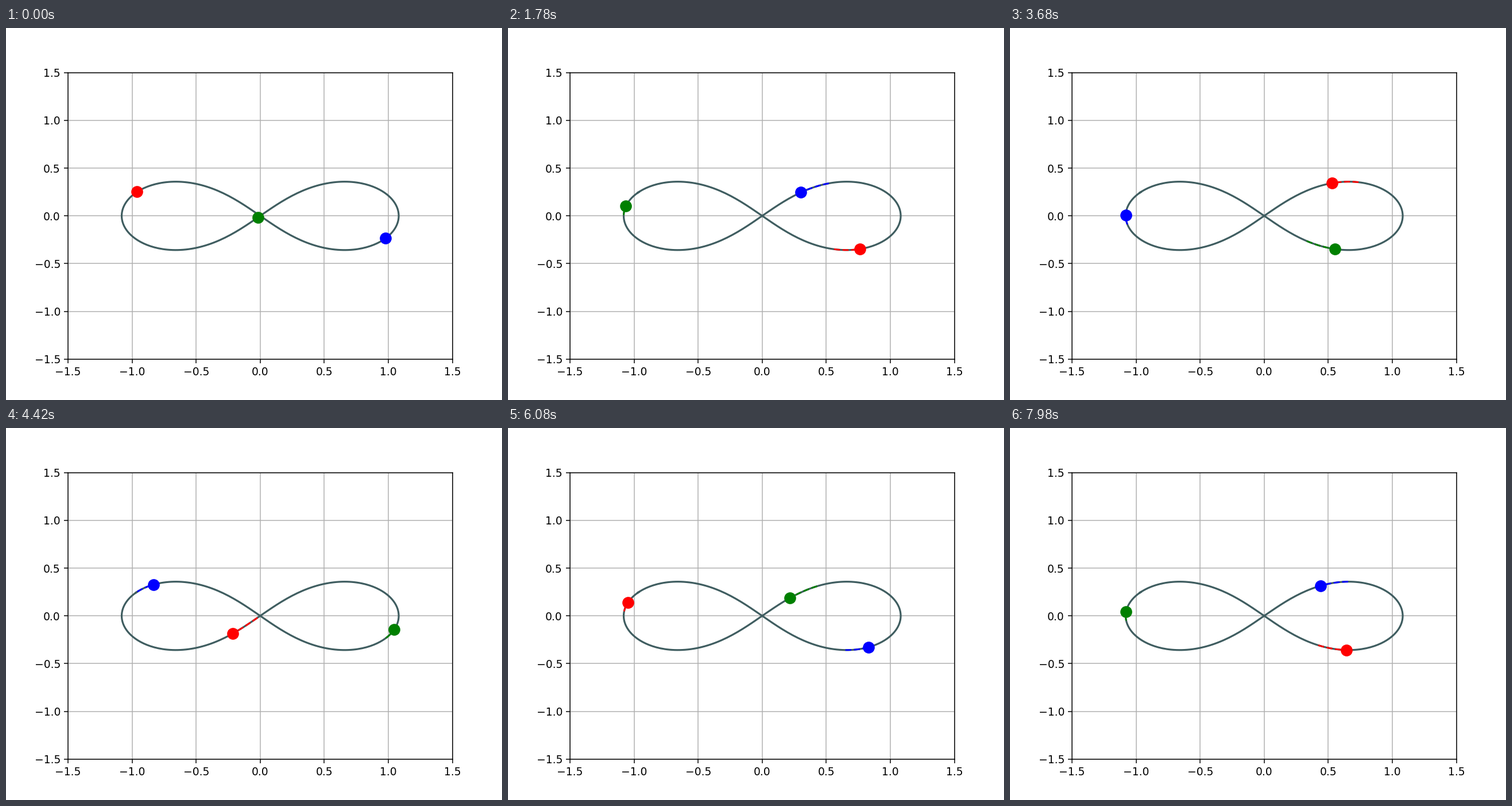
A matplotlib script that plays this animation: 864x648 px, repeating every 8000 ms.

```python
import numpy as np
import matplotlib.pyplot as plt
from matplotlib.animation import FuncAnimation

FRAMES = 400
INTERVAL = 20          # ms
DT = 0.02              # simulated time per frame
SUBSTEPS = 4
TAIL = 10              # steps kept in each coloured tail
PERIOD = 6.32591398
COLORS = ["red", "green", "blue"]


def acceleration(pos):
    """Gravity between three unit masses with G = 1."""
    diff = pos[None, :, :] - pos[:, None, :]
    dist = np.sqrt((diff ** 2).sum(axis=2)) + np.eye(3)
    return (diff / dist[:, :, None] ** 3).sum(axis=1)


def derivative(state):
    pos, vel = state
    return np.array([vel, acceleration(pos)])


def rk4(state, h):
    k1 = derivative(state)
    k2 = derivative(state + h / 2 * k1)
    k3 = derivative(state + h / 2 * k2)
    k4 = derivative(state + h * k3)
    return state + h / 6 * (k1 + 2 * k2 + 2 * k3 + k4)


def simulate(steps):
    """Figure-eight solution; returns positions as (step, body, axis)."""
    p = np.array([0.97000436, -0.24308753])
    v = np.array([-0.93240737, -0.86473146])
    state = np.array([[-p, 0 * p, p], [-v / 2, v, -v / 2]])
    path = [state[0]]
    for _ in range(steps):
        for _ in range(SUBSTEPS):
            state = rk4(state, DT / SUBSTEPS)
        path.append(state[0])
    return np.array(path)


path = simulate(FRAMES)

fig, ax = plt.subplots(figsize=(6.4, 4.8), dpi=135)
ax.set_xlim(-1.5, 1.5)
ax.set_ylim(-1.5, 1.5)
ax.grid(True)

loop = path[:int(PERIOD / DT) + 2, 0]
ax.plot(loop[:, 0], loop[:, 1], color="#3f5d60", lw=1.7)

tails = [ax.plot([], [], "--", color=c, lw=1.5)[0] for c in COLORS]
bodies = [ax.plot([], [], "o", color=c, ms=10)[0] for c in COLORS]


def update(frame):
    now = frame + 1
    recent = path[max(0, now - TAIL):now + 1]
    for i, (tail, body) in enumerate(zip(tails, bodies)):
        tail.set_data(recent[:, i, 0], recent[:, i, 1])
        body.set_data(recent[-1:, i, 0], recent[-1:, i, 1])
    return tails + bodies


anim = FuncAnimation(fig, update, frames=FRAMES, interval=INTERVAL,
                     repeat=True, repeat_delay=0)
plt.show()
```
